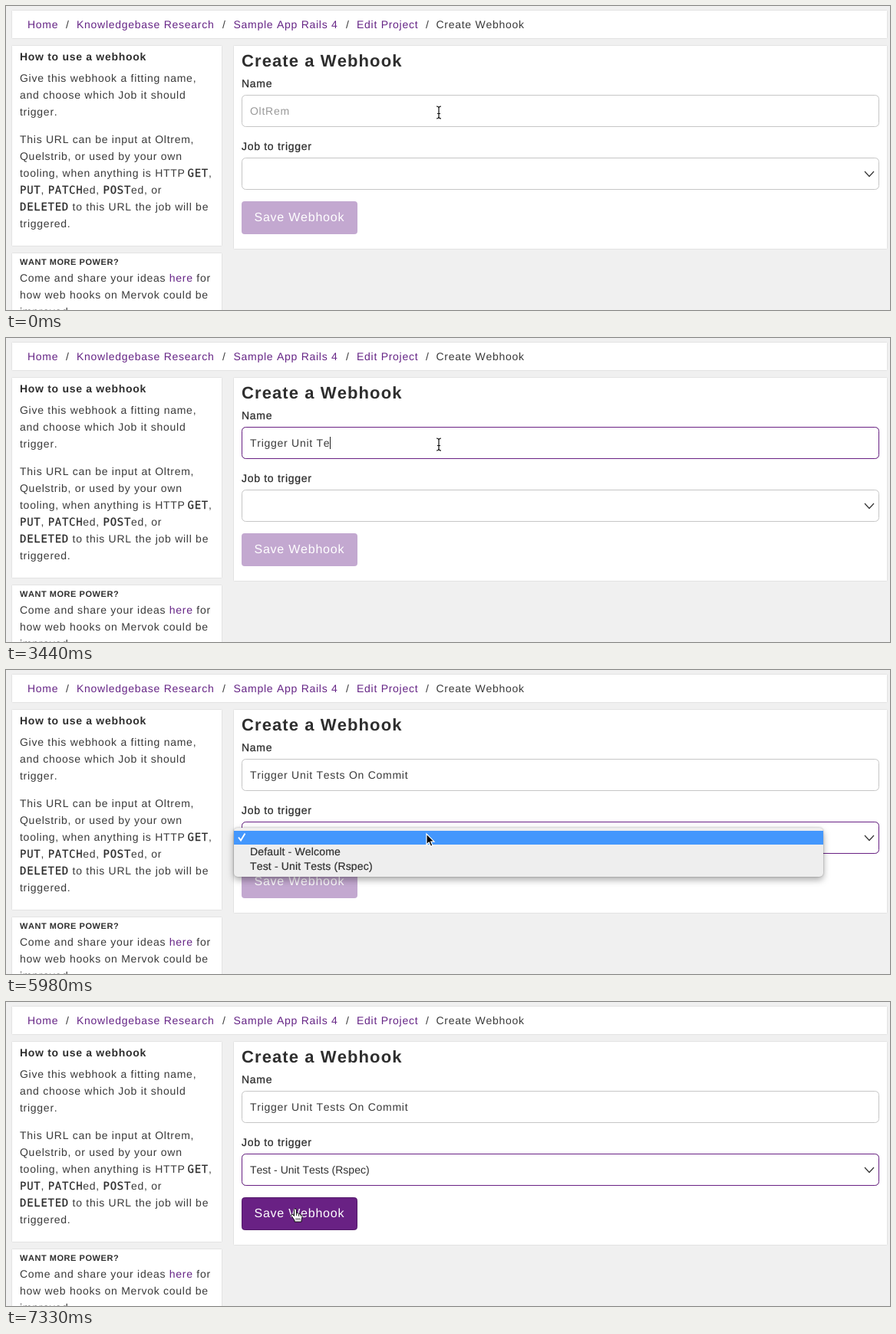
Recreate the animation shown at these times as an HTML page. Size 1152 px wide and 397 px high, loop 8 s.

```html
<!DOCTYPE html>
<html lang="en">
<head>
<meta charset="utf-8">
<title>Create a Webhook</title>
<style>
html, body { margin: 0; width: 100%; height: 100%; overflow: hidden; background: #f0f0f0; }
svg { display: block; }
text { font: 14px "Liberation Sans", Arial, sans-serif; font-kerning: none; letter-spacing: .052em; fill: #3a3a3a; white-space: pre; text-rendering: geometricPrecision; }
.link { fill: #662586; }
.bold { font-weight: bold; letter-spacing: .05em; fill: #2e2e2e; }
.label { letter-spacing: .05em; fill: #2a2a2a; stroke: #2a2a2a; stroke-width: .25; }
.code { font-family: "DejaVu Sans Mono", monospace; letter-spacing: .05em; fill: #2a2a2a; stroke: #2a2a2a; stroke-width: .25; }
.title { font-size: 22px; }
.small { font-size: 11px; }
.save { font-size: 16px; letter-spacing: .048em; fill: #fff; }
.hint { fill: #999; }
.native { letter-spacing: 0; fill: #303030; }
.option { letter-spacing: .012em; fill: #303030; stroke: #303030; stroke-width: .2; }
.option.on { fill: #fff; stroke: #fff; }
.panel { fill: #fff; stroke: #e3e3e3; }
.field { fill: #fff; stroke: #c6c6c6; }
.focus { fill: none; stroke: #692184; }
#menu { filter: drop-shadow(0 4px 5px rgba(0, 0, 0, .28)) drop-shadow(0 0 1px rgba(0, 0, 0, .28)); }
</style>
</head>
<body>
<svg width="1152" height="397" viewBox="0 0 1152 397">
  <rect class="panel" x="7.5" y="5.5" width="1141" height="37" rx="1"/>
  <rect class="panel" x="7.5" y="51.5" width="274" height="262" rx="1"/>
  <rect class="panel" x="7.5" y="322.5" width="274" height="90" rx="1"/>
  <rect class="panel" x="296.5" y="51.5" width="852" height="266" rx="1"/>

  <text y="29"><tspan class="link" x="28">Home</tspan><tspan x="78">/</tspan><tspan class="link" x="92">Knowledgebase Research</tspan><tspan x="282">/</tspan><tspan class="link" x="296.5">Sample App Rails 4</tspan><tspan x="443">/</tspan><tspan class="link" x="457">Edit Project</tspan><tspan x="547">/</tspan><tspan x="560.5">Create Webhook</tspan></text>

  <text class="bold" x="18" y="71">How to use a webhook</text>
  <text x="18" y="99">Give this webhook a fitting name,</text>
  <text x="18" y="121">and choose which Job it should</text>
  <text x="18" y="143">trigger.</text>
  <text x="18" y="179">This URL can be input at Oltrem,</text>
  <text x="18" y="201">Quelstrib, or used by your own</text>
  <text x="18" y="223">tooling, when anything is HTTP <tspan class="code" x="236.500">GET</tspan>,</text>
  <text x="18" y="245"><tspan class="code">PUT</tspan>, <tspan class="code">PATCH</tspan>ed, <tspan class="code">POST</tspan>ed, or</text>
  <text x="18" y="267"><tspan class="code">DELETED</tspan> to this URL the job will be</text>
  <text x="18" y="289">triggered.</text>
  <text class="bold small" x="18" y="338">WANT MORE POWER?</text>
  <text x="18" y="360">Come and share your ideas <tspan class="link">here</tspan> for</text>
  <text x="18" y="382">how web hooks on Mervok could be</text>
  <text x="18" y="404">improved.</text>

  <text class="bold title" x="307" y="79">Create a Webhook</text>
  <text class="label" x="307" y="106">Name</text>
  <rect class="field" x="307.5" y="116.5" width="830" height="41" rx="5"/>
  <rect class="focus" id="nameFocus" x="307.5" y="116.5" width="830" height="41" rx="5"/>
  <text class="hint" id="hint" x="318" y="142">OltRem</text>
  <text id="name" x="318" y="142" xml:space="preserve"></text>
  <rect id="caret" y="129" width="1" height="16" fill="#222"/>

  <text class="label" x="307" y="188">Job to trigger</text>
  <rect class="field" x="307.5" y="198.5" width="830" height="41" rx="5"/>
  <rect class="focus" id="jobFocus" x="307.5" y="198.5" width="830" height="41" rx="5"/>
  <text class="native" id="job" x="318" y="224">Test - Unit Tests (Rspec)</text>
  <path d="M1119 216l6 6.5 6-6.5" fill="none" stroke="#333" stroke-width="1.2"/>

  <rect x="307" y="255" width="151" height="43" rx="4" fill="#c3a8d0"/>
  <rect id="enabled" x="307.5" y="255.5" width="150" height="42" rx="4" fill="#692184" stroke="#531a69"/>
  <text class="save" x="323.5" y="281">Save Webhook</text>

  <g id="menu">
    <rect x="297" y="206" width="768" height="64" rx="5" fill="#eee"/>
    <rect id="bar" x="297" width="768" height="18" fill="#4397fd"/>
    <path id="check" d="M303 218.5l3 4 5.5-9" fill="none" stroke-width="1.9"/>
    <text class="option" x="318" y="242">Default - Welcome</text>
    <text class="option" id="test" x="318" y="261">Test - Unit Tests (Rspec)</text>
  </g>

  <g id="pointer">
    <g id="beam" fill="none">
      <path d="M-3-8q3 0 3 2.500q0-2.500 3-2.500M0-6V6M-3 8q3 0 3-2.500q0 2.500 3 2.500M-2 1.500H2" stroke="#fff" stroke-width="3"/>
      <path d="M-3-8q3 0 3 2.500q0-2.500 3-2.500M0-6V6M-3 8q3 0 3-2.500q0 2.500 3 2.500M-2 1.500H2" stroke="#111" stroke-width="1.200"/>
    </g>
    <path id="arrow" d="M0 0V14L3.200 11 5.500 16.300 8 15.200 5.700 10.200H10Z" stroke="#fff" stroke-width="1.200"/>
    <g id="hand" stroke="#111" stroke-linejoin="round">
      <path d="M-2.500 1.500V-6.500Q-2.500-8-1-8T.5-6.500V-2Q2.500-3.300 3.500-1.300 5.300-2 6 0 8.200-.5 8 2.500L7 6.500V9H-2V7L-6 1.500Q-7-.8-5-1Z" fill="#fff"/>
      <path d="M.5-2V1M3.500-1V2M6 0V2M.2 4V7M2.500 4V7M4.800 4V7" fill="none" stroke-width=".8"/>
    </g>
  </g>
</svg>
<script>
const LOOP = 8000, PHRASE = 'Trigger Unit Tests On Commit';
const el = id => document.getElementById(id);
const show = (id, amount) => el(id).setAttribute('opacity', +amount);

// Each row is [start time, value...]; a value holds until the next row.
const typing = [[0, 0], [1650, 1], [1950, 2], [2100, 4], [2250, 5], [2390, 7], [2540, 8],
  [2690, 9], [2840, 10], [2990, 11], [3140, 12], [3290, 13], [3440, 15], [3740, 16], [3890, 18],
  [4040, 20], [4340, 21], [4490, 22], [4640, 24], [4790, 25], [4940, 26], [5240, 28]];
const pointer = [[0, 'beam', 564, 139], [5390, 'beam', 562, 149], [5530, 'arrow', 556, 180],
  [5680, 'arrow', 551, 200], [5830, 'arrow', 549.5, 205], [5980, 'arrow', 548, 214],
  [6130, 'arrow', 539, 236], [6280, 'arrow', 526.5, 252], [6430, 'arrow', 523, 256],
  [6580, 'arrow', 520.5, 257.5], [7030, 'arrow', 514, 260], [7180, 'arrow', 430, 270], [7330, 'hand', 378, 278]];
const nameFocus = [[0, 0], [450, .5], [600, 1], [5680, .5], [5830, 0]];
const jobFocus = [[0, 0], [5680, .5], [5830, 1]];
const highlight = [[0, 0], [6430, 2], [6880, -1], [7030, 2]];
const enabled = [[0, 0], [7180, .6], [7330, 1]];

const at = (rows, t) => rows.findLast(row => row[0] <= t).slice(1);
const between = (t, from, to) => t >= from && t < to;

function draw(t) {
  const [count] = at(typing, t), [row] = at(highlight, t), [shape, x, y] = at(pointer, t);
  const name = el('name');
  name.textContent = PHRASE.slice(0, count);
  show('hint', count === 0);
  const width = count ? name.getComputedTextLength() : 0;
  el('caret').setAttribute('x', 318 + Math.round(width));
  show('caret', between(t, 450, 1050) || between(t, 1650, 5680));

  show('nameFocus', at(nameFocus, t)[0]);
  show('jobFocus', at(jobFocus, t)[0]);
  show('job', t >= 7180);
  show('enabled', at(enabled, t)[0]);

  show('menu', between(t, 5980, 7180));
  show('bar', row >= 0);
  el('bar').setAttribute('y', 210 + 19 * row);
  el('check').setAttribute('stroke', row === 0 ? '#fff' : '#222');
  el('test').classList.toggle('on', row === 2);

  el('pointer').setAttribute('transform', `translate(${x} ${y})`);
  for (const id of ['beam', 'arrow', 'hand']) show(id, id === shape);
}

function tick() {
  draw(performance.now() % LOOP);
  requestAnimationFrame(tick);
}
tick();
</script>
</body>
</html>
```
